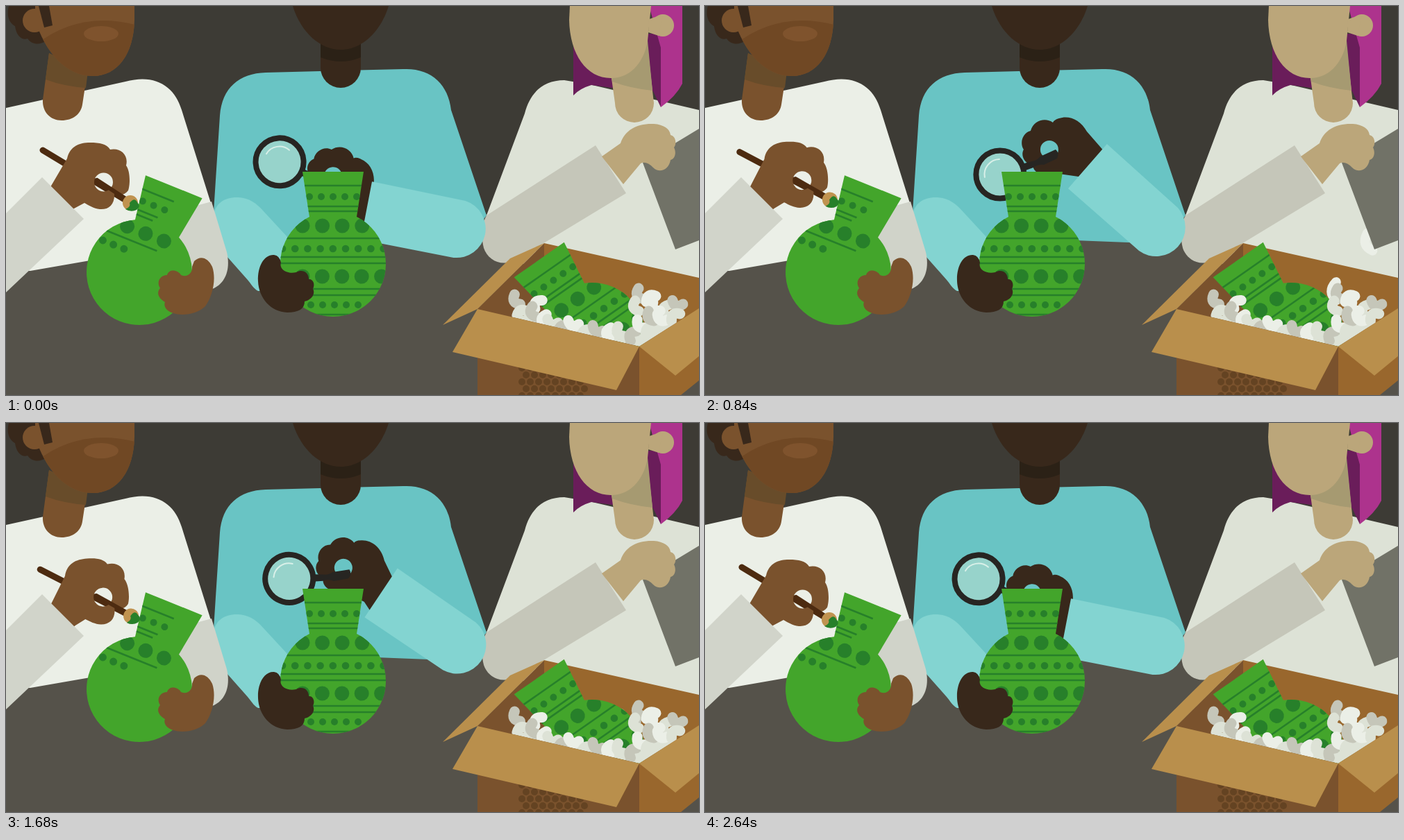
These frames come from a looping animation (998 by 561 pixels, 2670 ms). An HTML page:

```html
<!DOCTYPE html>
<html lang="en">
<head>
<meta charset="utf-8">
<title>Paint, inspect, pack</title>
<style>
html, body { margin: 0; width: 100%; height: 100%; overflow: hidden; background: #3d3b35; }
svg { display: block; width: 100%; height: 100%; }
</style>
</head>
<body>
<svg id="stage" viewBox="0 0 998 561" preserveAspectRatio="none"></svg>
<script>
const LOOP = 2670;
const C = {
  green: '#43a52b', leaf: '#27802a', brown: '#7a522d', dark: '#38281b', sand: '#bba67a',
  teal: '#69c4c4', aqua: '#83d4d1', ink: '#272522', tan: '#b98f4c', wood: '#99672d',
  white: '#ebefe7', pale: '#dde2d6', grey: '#c5c6b9'
};

const shape = (d, fill, extra = '') => `<path d="${d}" fill="${fill}" ${extra}/>`;
const line = (d, color, w, extra = '') =>
  `<path d="${d}" fill="none" stroke="${color}" stroke-width="${w}" ${extra}/>`;
const dot = (x, y, r, fill) => `<circle cx="${x}" cy="${y}" r="${r}" fill="${fill}"/>`;
const group = (attrs, ...parts) => `<g ${attrs}>${parts.join('')}</g>`;
const ROUND = 'stroke-linecap="round"';

// Vase, centred on its round body
const VASE = 'M-44-133H44L34-68A76 76 0 1 1-34-68Z';
const dots = (y, r, from, to, step) => {
  let s = '';
  for (let x = from; x <= to; x += step) s += dot(x, y, r, C.leaf);
  return s;
};
const bar = (y, to = 80) => line(`M-80 ${y}H${to}`, C.leaf, 2.6);

const fullPattern = [
  ...[-113, -83, -76, -37, -10, -1, 36, 45, 73].map(y => bar(y)),
  dots(-97, 5, -34, 34, 17), dots(-55, 10.5, -44, 45, 28.6), dots(-22, 5.3, -73, 74, 18.2),
  dots(18, 10.5, -44, 75, 28.4), dots(59, 5, -49, 50, 17)
].join('');

const startedPattern = [
  bar(-113, 8), bar(-83, -5), bar(-76, -10), bar(-38, 12),
  dots(-97, 5, -34, 0, 17), dots(-55, 10.5, -41, 17, 28.5), dots(-23, 5.5, -66, -17, 16.4)
].join('');

const vase = (x, y, turn, pattern) => group(`transform="translate(${x} ${y}) rotate(${turn})"`,
  shape(VASE, C.green), group('clip-path="url(#vase)"', pattern));

const painterBody = [
  shape('M0 147L172 109C215 97 243 116 253 150L299 297L305 335L35 382H0Z', C.white),
  shape('M4 0C0 16 6 25 13 29C15 45 25 50 31 47C38 57 50 56 58 50L70 0Z', C.dark),
  shape('M62 68L53 135C52 153 64 165 80 165C96 165 108 156 110 142L117 96Z', C.brown),
  shape('M62 68L57 106Q84 116 115 118L118 94Z', '#684c2a'),
  group('clip-path="url(#face)"',
    shape('M0 0H200V110H0Z', C.brown),
    shape('M40 58Q105 5 190 28V110H40Z', '#704824'),
    '<ellipse cx="137" cy="40" rx="25" ry="11" fill="#7f532d"/>'),
  dot(41, 21, 17, C.brown),
  shape('M47 0H62L67 28L55 31Z', C.dark),
  shape('M245 296L296 282L318 355C324 381 315 401 297 408L235 400Z', '#d0d3c9')
].join('');

const painterHands = [
  shape('M271 368C280 359 291 363 297 376C303 393 298 418 287 433C275 445 252 448 238 442C229 438 227 431 229 427C218 421 217 412 222 407C216 398 222 388 232 388C235 378 248 381 252 388C261 392 269 385 268 376Z', C.brown),
  group('id="brush"',
    line('M53 208L174 281', '#4d2b10', 9, ROUND),
    shape('M60 273L64 261L88 220C92 202 106 197 121 197C135 197 145 199 150 207C164 204 177 214 173 230C179 238 179 257 176 266C171 273 163 274 156 270C157 286 148 294 135 293C126 292 120 288 113 284L98 292L84 302ZM154 254A13.5 13.5 0 1 0 127 254A13.5 13.5 0 1 0 154 254Z', C.brown, 'fill-rule="evenodd"'),
    line('M131 251L174 279', '#4d2b10', 6, ROUND),
    dot(179, 284, 11, '#c09350'),
    shape('M172 293Q180 290 178 284Q185 275 189 283Q195 289 188 294Q180 298 172 293Z', C.leaf)),
  shape('M52 247L112 307L0 413V299Z', '#d1d4ca')
].join('');

const inspectorBody = [
  shape('M299 297L308 158C311 118 336 97 374 96L572 91C612 89 637 113 641 150L692 302L660 343L405 333Z', C.teal),
  shape('M453 40H511V89A29 29 0 0 1 453 89Z', C.dark),
  shape('M453 50H511V74Q482 86 453 74Z', '#2b2116'),
  shape('M413 0C425 39 453 63 482 63S539 39 551 0Z', C.dark),
  shape('M299 304C300 284 316 275 335 276C351 277 361 285 370 295L430 360V410L363 411C357 408 353 401 348 395L310 352C303 340 299 322 299 304Z', C.aqua)
].join('');

const lens = [
  dot(425, 243, 34.5, '#97d3cb'),
  `<circle cx="425" cy="243" r="34.5" fill="none" stroke="${C.ink}" stroke-width="8"/>`,
  line('M403 247A22 22 0 0 1 424 221', '#d9f0e9', 2, ROUND),
  shape('M456 228L471 224Q478 223 483 217L505 207Q511 212 507 220L488 229Q480 228 473 233L459 238Z', C.ink)
].join('');

const inspectorArm = group('id="arm"',
  group('id="wrist"',
    shape('M590 225L572 206L550 181C541 164 524 157 510 162Q503 164 501 168C490 160 473 165 469 180C457 183 453 198 459 207C454 216 461 229 472 228C472 240 485 246 497 240L538 246L560 265ZM509 207A13 13 0 1 0 483 207A13 13 0 1 0 509 207Z', C.dark, 'fill-rule="evenodd"'),
    lens),
  shape('M579 199L681 291A42 42 0 0 1 625 353L523 263Z', C.aqua));

const inspectorHand = shape('M386 359C372 358 362 375 363 397C364 421 381 441 405 442C421 442 430 437 430 426C440 424 446 415 442 408C446 400 441 393 436 394C436 384 427 379 418 384C405 387 393 380 396 370Q394 360 386 359Z', C.dark);

const packerBody = [
  shape('M747 155C755 124 774 107 804 107L840 113L998 150V450H780L735 350L692 302Z', C.pale),
  shape('M817 40H943V146L932 123L873 118L843 114Q826 119 817 129Z', '#6a1d5a'),
  shape('M926 0H974V112Q965 130 943 146V60Z', '#ad338d'),
  shape('M870 90L877 140A28 28 0 0 0 933 140L924 60Z', C.sand),
  shape('M871 95L873 109Q900 119 931 122L924 50Z', '#a69a71'),
  shape('M812 0L811 20C812 70 836 104 871 104C903 104 920 76 924 50L929 0Z', C.sand),
  dot(946, 28, 16, C.sand),
  shape('M926 19L946 12L940 43L925 38Z', C.sand),
  shape('M849 201L893 270L735 366C714 377 694 367 688 349C684 333 685 315 692 302Z', C.grey)
].join('');

const packerHand = [
  shape('M917 226L998 177V338L964 351Z', '#717267'),
  shape('M858 217L885 198C891 179 909 169 933 170C947 171 956 177 957 186C965 188 966 199 962 204C966 212 963 221 957 222C955 236 941 242 932 233Q922 223 914 227L889 257Z', C.sand)
].join('');

const boxBack = [
  shape('M775 342L998 392V470H775Z', C.wood),
  shape('M775 342V470L679 437Z', C.brown),
  shape('M775 342L726 364L629 460L679 437Z', C.tan)
].join('');

// Packing peanuts: x, y, turn
const heap = [
  [910, 416, 70], [927, 419, 150], [948, 437, 110], [966, 431, 20], [934, 436, 50], [905, 434, 70],
  [733, 425, 60], [764, 428, 130], [742, 440, 160], [757, 442, 70], [773, 452, 100],
  [786, 458, 20], [800, 463, 145], [816, 460, 20], [833, 470, 130], [850, 468, 30],
  [866, 471, 100], [882, 471, 60], [900, 474, 120], [912, 461, 45], [925, 466, 140],
  [926, 449, 60], [943, 452, 30], [962, 446, 140]
];
const peanutTones = [C.grey, C.pale, C.white];
const peanut = ([x, y, turn], i) =>
  line('M-8-4Q0 7 8-4', peanutTones[i * 2 % 3], 15, `${ROUND} transform="translate(${x} ${y}) rotate(${turn})"`);

const boxFill = shape('M735 444L770 452L830 465L912 474L955 450L966 457L912 491L735 451Z', C.pale) +
  heap.map(peanut).join('');

let stamp = '';
for (let row = 0; row < 5; row++)
  for (let col = 0; col < 8; col++)
    stamp += dot(743 + col * 12 + row % 2 * 6, 522 + row * 10, 5, '#644322');

const boxFront = [
  shape('M679 437L912 491V561H679Z', C.brown), stamp,
  shape('M912 491L998 436V540L972 561H912Z', C.wood),
  shape('M912 491L998 436V505L964 533Z', C.tan),
  shape('M679 437L912 491L879 554L643 499Z', C.tan)
].join('');

// Falling peanuts: start time, colour, turn, spin
const drops = [
  [280, C.grey, 0, 30], [520, C.white, 20, 80], [790, C.white, 60, 70], [1130, C.white, 20, 70],
  [1298, C.grey, -5, 30], [1808, C.grey, -5, 30], [1900, C.white, 270, 60], [2120, C.white, 200, 80]
];
const falling = drops.map(d => line('M-13-4Q0 11 13-2', d[1], 14, `${ROUND} class="drop"`)).join('');

const stage = document.getElementById('stage');
stage.innerHTML = [
  `<defs><clipPath id="vase"><path d="${VASE}"/></clipPath>
   <clipPath id="face"><path d="M42 0H185V20C184 70 160 101 125 101C86 101 56 66 42 20Z"/></clipPath></defs>`,
  shape('M0 0H998V561H0Z', '#3d3b35'), shape('M0 300H998V561H0Z', '#55524a'),
  inspectorBody, painterBody, packerBody,
  inspectorArm, vase(471, 372, 0, fullPattern), inspectorHand,
  vase(192, 384, 22, startedPattern), painterHands,
  boxBack, falling, packerHand, vase(844, 475, -35, fullPattern), boxFill, boxFront
].join('');

const brush = document.getElementById('brush');
const arm = document.getElementById('arm');
const wrist = document.getElementById('wrist');
const dropNodes = [...document.querySelectorAll('.drop')];

// Time, elbow angle, wrist angle
const armKeys = [
  [0, -30.3, 72], [500, -30.3, 72], [870, 0, 0], [1240, 0, 0],
  [1950, -9.5, 29.5], [2250, -9.5, 29.5], [2640, -30.3, 72], [LOOP, -30.3, 72]
];
const cubic = u => u < .5 ? 4 * u ** 3 : 1 - 4 * (1 - u) ** 3;
const wave = u => (1 - Math.cos(Math.PI * u)) / 2;

function armPose(t) {
  const i = armKeys.findIndex(k => k[0] > t);
  const a = armKeys[i - 1], b = armKeys[i];
  const u = cubic((t - a[0]) / (b[0] - a[0]));
  return [1, 2].map(n => a[n] + (b[n] - a[n]) * u);
}

function draw(t) {
  const s = t % (LOOP / 2);
  const stroke = s < 500 ? wave(s / 500) : 1 - wave((s - 500) / 835);
  brush.setAttribute('transform', `rotate(${-5 * stroke} 98 265)`);

  const [elbow, hand] = armPose(t);
  arm.setAttribute('transform', `rotate(${elbow} 653 322)`);
  wrist.setAttribute('transform', `rotate(${hand} 545 212)`);

  drops.forEach(([start, , turn, spin], i) => {
    const u = (t - start) / 400, node = dropNodes[i];
    node.setAttribute('visibility', u >= 0 && u <= 1 ? 'visible' : 'hidden');
    node.setAttribute('transform',
      `translate(${964 - 72 * u} ${328 + 104 * u}) rotate(${turn + spin * u})`);
  });
}

const began = performance.now();
function tick() {
  draw((performance.now() - began) % LOOP);
  requestAnimationFrame(tick);
}
tick();
</script>
</body>
</html>
```
